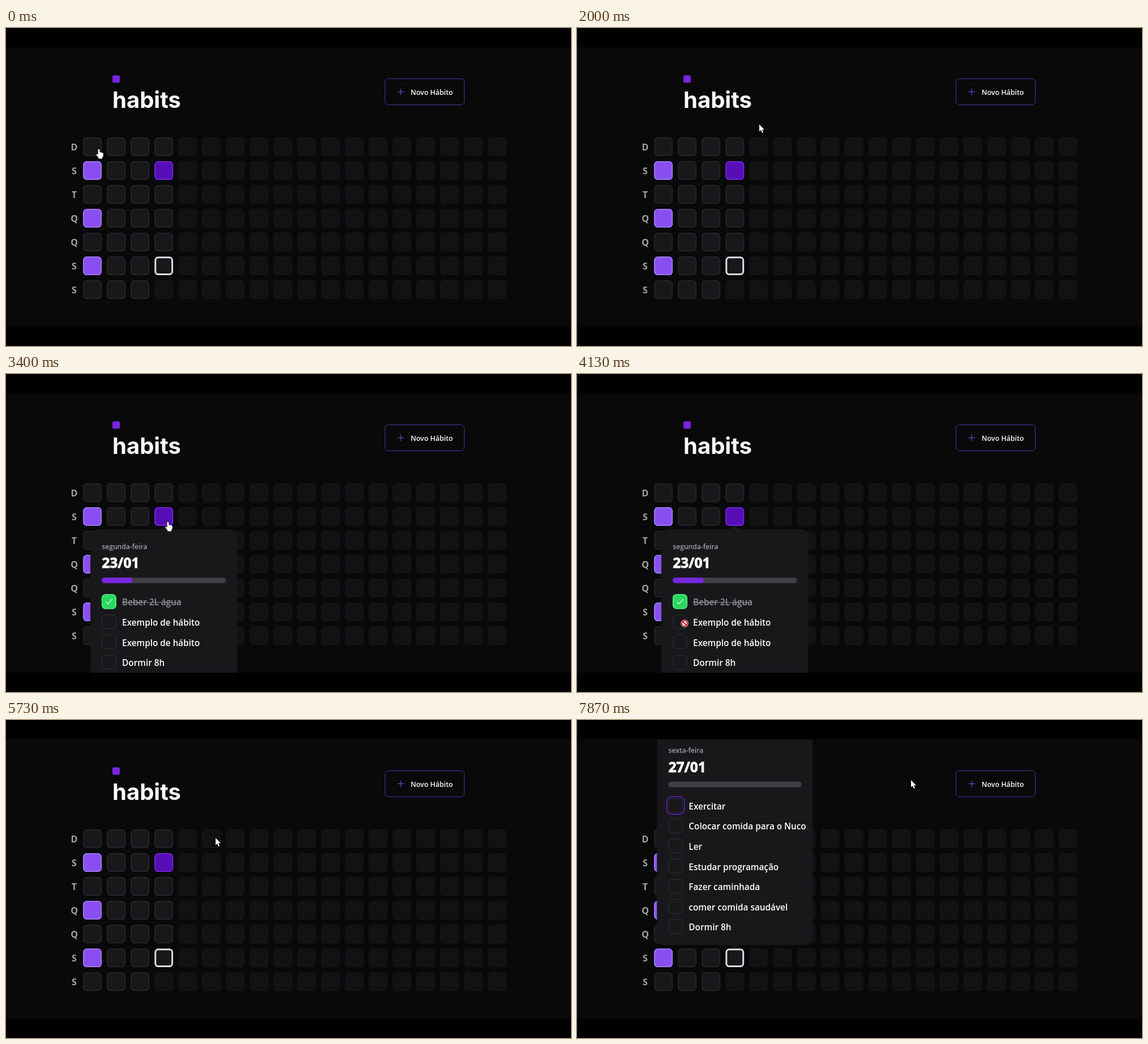
These frames come from a looping animation (998 px wide and 561 px high, 8000 ms). An HTML page with a canvas:

```html
<!DOCTYPE html>
<html lang="pt-BR">
<head>
<meta charset="utf-8">
<title>habits</title>
<style>
  html, body { margin: 0; width: 100%; height: 100%; overflow: hidden; background: #000; }
  canvas { display: block; width: 998px; height: 561px; }
</style>
</head>
<body>
<canvas id="stage" width="998" height="561"></canvas>
<script>
const ctx = document.getElementById('stage').getContext('2d');
const LOOP = 8000, FPS = 15;
const SANS = '"Open Sans", "Noto Sans", sans-serif';
const BG = '#09090a', PANEL = '#18181b', LINE = '#29292d', GRAY = '#a1a1aa';
const VIOLET = '#7726de', RING = '#6a22cc';
const PITCH = 42.05, CELL = 32.8;
const cellX = col => 136.2 + col * PITCH;
const cellY = row => 193 + row * PITCH;

// Times at which each panel opens, loads its list and closes
const panels = [
  { open: 730, load: 800, close: 1930, press: 670, col: 0, row: 1, day: 'segunda-feira', date: '02/01',
    done: 1, items: ['Beber 2L água'] },
  { open: 2870, load: 2930, close: 5270, press: 2730, col: 3, row: 1, day: 'segunda-feira', date: '23/01',
    done: 1, items: ['Beber 2L água', 'Exemplo de hábito', 'Exemplo de hábito', 'Dormir 8h'] },
  { open: 6530, load: 6600, close: LOOP, press: 6400, col: 3, row: 5, day: 'sexta-feira', date: '27/01',
    done: 0, above: true, wide: 275, focus: true,
    items: ['Exercitar', 'Colocar comida para o Nuco', 'Ler', 'Estudar programação',
      'Fazer caminhada', 'comer comida saudável', 'Dormir 8h'] }
];

// time, x, y, pointer shape
const path = [
  [0, 164, 214, hand], [330, 154, 256, hand], [1400, 154, 256, hand],
  [1600, 200, 224, hand], [1730, 262, 190, arrow], [1870, 322, 170, arrow],
  [2070, 322, 170, arrow], [2400, 298, 225, hand], [2670, 286, 261, hand],
  [3400, 286, 261, hand], [3530, 272, 300, arrow], [4000, 196, 425, arrow],
  [4130, 190, 440, forbid], [4470, 188, 475, forbid], [4670, 290, 400, arrow],
  [4870, 360, 270, forbid], [5130, 379, 187, forbid], [5270, 379, 187, arrow],
  [5670, 379, 185, arrow], [5800, 360, 235, forbid], [6200, 297, 390, hand],
  [6400, 288, 425, hand], [6600, 288, 425, hand], [6670, 315, 390, arrow],
  [6870, 430, 245, forbid], [7000, 520, 165, arrow], [7200, 590, 106, arrow]
];

function box(x, y, w, h, r, fill, stroke, lw = 1.5) {
  ctx.beginPath();
  ctx.roundRect(x, y, w, h, r);
  ctx.fillStyle = fill;
  ctx.fill();
  if (!stroke) return;
  ctx.beginPath();
  ctx.roundRect(x + lw / 2, y + lw / 2, w - lw, h - lw, Math.max(0, r - lw / 2));
  ctx.strokeStyle = stroke;
  ctx.lineWidth = lw;
  ctx.stroke();
}

function text(str, x, y, size, weight, color, family = SANS, align = 'left') {
  ctx.font = `${weight} ${size}px ${family}`;
  ctx.textAlign = align;
  ctx.fillStyle = color;
  ctx.fillText(str, x, y);
}

function line(color, width, ...pts) {
  ctx.beginPath();
  pts.forEach(([x, y]) => ctx.lineTo(x, y));
  ctx.strokeStyle = color;
  ctx.lineWidth = width;
  ctx.stroke();
}

function ring(x, y, size) {
  box(x - 3.2, y - 3.2, size + 6.4, size + 6.4, 9.5, BG, RING, 1.7);
}

function header() {
  box(188, 83.5, 13, 13, 2.5, VIOLET);
  text('habits', 188, 141, 40, 700, '#fff', 'Inter, sans-serif');
  box(669, 89, 141, 47, 6.5, BG, '#5233a0', 1);
  line('#6f48cc', 1.2, [691.5, 112.5], [703, 112.5]);
  line('#6f48cc', 1.2, [697.2, 107], [697.2, 118.3]);
  text('Novo Hábito', 714.8, 117.6, 12.4, 600, '#fff');
}

function cell(col, row) {
  let fill = PANEL, edge = LINE, lw = 1.5;
  if (col === 0 && row % 2) [fill, edge] = ['#884ff0', '#a783fa'];
  if (col === 3 && row === 1) [fill, edge] = ['#560fb4', '#792be6'];
  if (col === 3 && row === 5) [edge, lw] = ['#dcdce0', 3];
  const future = col * 7 + row > 26;
  ctx.globalAlpha = future ? 0.6 : 1;
  box(cellX(col), cellY(row), CELL, CELL, 6.5, fill, future ? '#1a1a1d' : edge, lw);
  ctx.globalAlpha = 1;
}

function grid(t) {
  [...'DSTQQSS'].forEach((d, row) =>
    text(d, 120.5, cellY(row) + 22.8, 16, 700, GRAY, SANS, 'center'));
  const hit = panels.find(p => t >= p.press && t < p.open);
  if (hit) ring(cellX(hit.col), cellY(hit.row), CELL);
  for (let col = 0; col < 18; col++)
    for (let row = 0; row < 7; row++) cell(col, row);
}

function habit(label, x, y, checked, focused) {
  if (focused) ring(x, y, 26);
  if (checked) {
    box(x, y, 26, 26, 6.5, '#2bd85e', '#50ec86');
    line('#eafff0', 1.1, [x + 7.5, y + 13.5], [x + 11.2, y + 17], [x + 18.7, y + 8.8]);
  } else {
    box(x, y, 26, 26, 6.5, PANEL, LINE);
  }
  text(label, x + 36.2, y + 20, 15.3, 600, checked ? '#92929a' : '#fff');
  if (checked) {
    const w = ctx.measureText(label).width;
    line('#92929a', 1.2, [x + 36, y + 14.6], [x + 36 + w, y + 14.6]);
  }
}

function panel(p, t) {
  const items = t >= p.load ? p.items : [];
  const w = items.length && p.wide || 259.5;
  const h = 134 + (items.length ? 26 + (items.length - 1) * 35.6 : 0);
  const mid = cellX(p.col) + CELL / 2;
  const x = mid - w / 2, y = p.above ? 397 - h : 274;
  const edge = p.above ? 397 : 274, tip = p.above ? 6.5 : -6.5;
  box(x, y, w, h, 13, PANEL);
  ctx.beginPath();
  ctx.moveTo(mid - 6.5, edge);
  ctx.lineTo(mid, edge + tip);
  ctx.lineTo(mid + 6.5, edge);
  ctx.fill();

  const left = x + 19.9, full = w - 39.6;
  text(p.day, left + 0.4, y + 35, 12.1, 600, GRAY);
  text(p.date, left + 0.4, y + 68.3, 24.5, 800, '#fff', '"Noto Sans", sans-serif');
  // thicken the digits to a black weight
  ctx.strokeStyle = '#fff';
  ctx.lineWidth = 0.9;
  ctx.strokeText(p.date, left + 0.4, y + 68.3);
  box(left, y + 85.3, full, 9.7, 4.9, '#3f3f46');
  if (items.length && p.done) box(left, y + 85.3, full * p.done / items.length, 9.7, 4.9, VIOLET);
  items.forEach((label, i) =>
    habit(label, left, y + 114.4 + i * 35.6, i < p.done, p.focus && i === 0));
}

function shape(points, fill) {
  ctx.beginPath();
  points.forEach(([x, y]) => ctx.lineTo(x, y));
  ctx.closePath();
  ctx.strokeStyle = '#000';
  ctx.lineWidth = 1.2;
  ctx.stroke();
  ctx.fillStyle = fill;
  ctx.fill();
}

function arrow() {
  shape([[0, 0], [0, 12.6], [2.9, 10], [5, 15], [7, 14.1], [5, 9.4], [8.9, 9.2]], '#fff');
}

function hand() {
  shape([[-1.4, 0.4], [0, -0.7], [1.3, 0.4], [1.6, 5], [4.3, 5.5], [7.2, 6.6], [8, 8.2],
    [7.6, 12], [6.2, 14.3], [6, 16.6], [-0.4, 16.6], [-1.2, 14], [-4.6, 9.7],
    [-4.1, 8.3], [-2.6, 8.5], [-1.4, 10]], '#fff');
}

function forbid() {
  ctx.beginPath();
  ctx.arc(0, 0, 6.5, 0, Math.PI * 2);
  ctx.fillStyle = '#fff';
  ctx.fill();
  ctx.beginPath();
  ctx.arc(0, 0, 4.8, 0, Math.PI * 2);
  ctx.strokeStyle = '#c8000c';
  ctx.lineWidth = 1.8;
  ctx.stroke();
  line('#c8000c', 1.8, [-3.3, -3.3], [3.3, 3.3]);
}

function pointer(t) {
  let i = path.length - 1;
  while (path[i][0] > t) i--;
  const [t0, x0, y0, draw] = path[i];
  const [t1, x1, y1] = path[i + 1] || [LOOP, x0, y0];
  const k = (t - t0) / (t1 - t0);
  ctx.save();
  ctx.translate(x0 + (x1 - x0) * k, y0 + (y1 - y0) * k);
  draw();
  ctx.restore();
}

function frame(now) {
  const step = Math.floor(((now % LOOP) + 4) * FPS / 1000) % (LOOP * FPS / 1000);
  const t = Math.round(step / FPS * 100) * 10;
  ctx.fillStyle = BG;
  ctx.fillRect(0, 0, 998, 561);
  header();
  grid(t);
  const shown = panels.find(p => t >= p.open && t < p.close);
  if (shown) panel(shown, t);
  pointer(t);
  ctx.fillStyle = '#000';
  ctx.fillRect(0, 0, 998, 34);
  ctx.fillRect(0, 527, 998, 34);
}

const start = performance.now();
function tick() {
  frame(performance.now() - start);
  requestAnimationFrame(tick);
}
tick();
</script>
</body>
</html>
```
